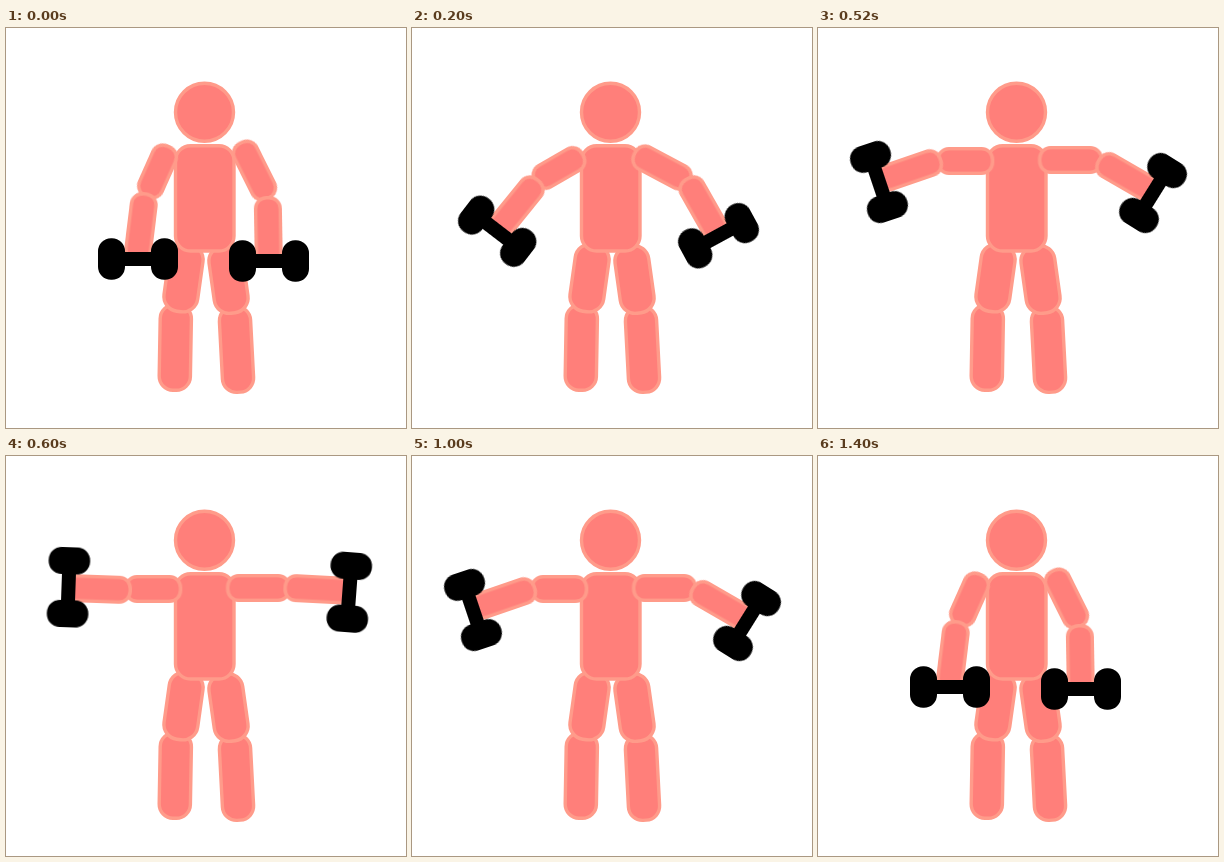
An HTML page that plays this animation: 400x400 px, repeating every 1600 ms.

```html
<!DOCTYPE html>
<html lang="en">
<head>
<meta charset="utf-8">
<title>Lateral raise</title>
<style>
  html, body { margin: 0; width: 100%; height: 100%; overflow: hidden; background: #fff; }
  svg { display: block; width: 100%; height: 100%; }

  .skin { fill: #ff7f7a; stroke: #ff9b8a; stroke-width: 3.4; }

  /* Each moving part has four poses, a (arms down) to d (arms level). */
  .move { animation: lift 1600ms step-end infinite; }
  @keyframes lift {
    0%, 87.5%, 100% { transform: var(--a); }
    12.5%, 75% { transform: var(--b); }
    25%, 62.5% { transform: var(--c); }
    37.5% { transform: var(--d); }
  }

  #upper-left {
    --a: translate(151.5px, 143.5px) rotate(24deg);
    --b: translate(147px, 140px) rotate(60deg);
    --c: translate(147.3px, 133px) rotate(90deg);
    --d: translate(147.3px, 133px) rotate(90deg);
  }
  #fore-left {
    --a: translate(135px, 199px) rotate(7deg);
    --b: translate(105px, 178.2px) rotate(39deg);
    --c: translate(91px, 142.4px) rotate(71deg);
    --d: translate(91px, 133px) rotate(92deg);
  }
  #bell-left {
    --a: translate(132px, 231px) rotate(0deg);
    --b: translate(85.2px, 203.2px) rotate(37.5deg);
    --c: translate(61px, 154px) rotate(71.4deg);
    --d: translate(62.5px, 131.2px) rotate(92deg);
  }
  #upper-right {
    --a: translate(248.5px, 142.5px) rotate(-26.5deg);
    --b: translate(250px, 139.5px) rotate(-62deg);
    --c: translate(252.5px, 132px) rotate(-90deg);
    --d: translate(252.5px, 132px) rotate(-90deg);
  }
  #fore-right {
    --a: translate(262.3px, 203px) rotate(-1deg);
    --b: translate(291.3px, 180px) rotate(-29.5deg);
    --c: translate(309.8px, 149px) rotate(-60deg);
    --d: translate(312.4px, 133.3px) rotate(-87deg);
  }
  #bell-right {
    --a: translate(263px, 233px) rotate(0deg);
    --b: translate(306.5px, 207.7px) rotate(-28.5deg);
    --c: translate(335px, 165px) rotate(-58deg);
    --d: translate(343.3px, 136.3px) rotate(-85.7deg);
  }
</style>
</head>
<body>
<svg viewBox="0 0 400 400">
  <defs>
    <rect id="shin" x="-15.6" y="-42.8" width="31.2" height="85.6" rx="14"/>
    <rect id="thigh" x="-17" y="-33.8" width="34" height="67.6" rx="15"/>
    <rect id="forearm" x="-12.3" y="-33.3" width="24.6" height="66.6" rx="11"/>
    <g id="bell">
      <rect x="-30" y="-7" width="60" height="14"/>
      <rect x="-40" y="-20.7" width="27" height="41.4" rx="13"/>
      <rect x="13" y="-20.7" width="27" height="41.4" rx="13"/>
    </g>
  </defs>

  <g class="skin">
    <use href="#shin" transform="translate(169.3 319.5) rotate(1)"/>
    <use href="#shin" transform="translate(230.5 321.5) rotate(-3)"/>
    <use href="#thigh" transform="translate(177.5 250) rotate(8)"/>
    <use href="#thigh" transform="translate(222.5 251.5) rotate(-8)"/>
    <rect x="169.5" y="117.7" width="58.5" height="105.3" rx="15"/>
    <circle cx="198.5" cy="84.3" r="29"/>

    <rect id="upper-left" class="move" x="-12.3" y="-27.3" width="24.6" height="54.6" rx="11"/>
    <use id="fore-left" class="move" href="#forearm"/>
    <rect id="upper-right" class="move" x="-12.3" y="-30.8" width="24.6" height="61.6" rx="11"/>
    <use id="fore-right" class="move" href="#forearm"/>
  </g>

  <use id="bell-left" class="move" href="#bell"/>
  <use id="bell-right" class="move" href="#bell"/>
</svg>
</body>
</html>
```
